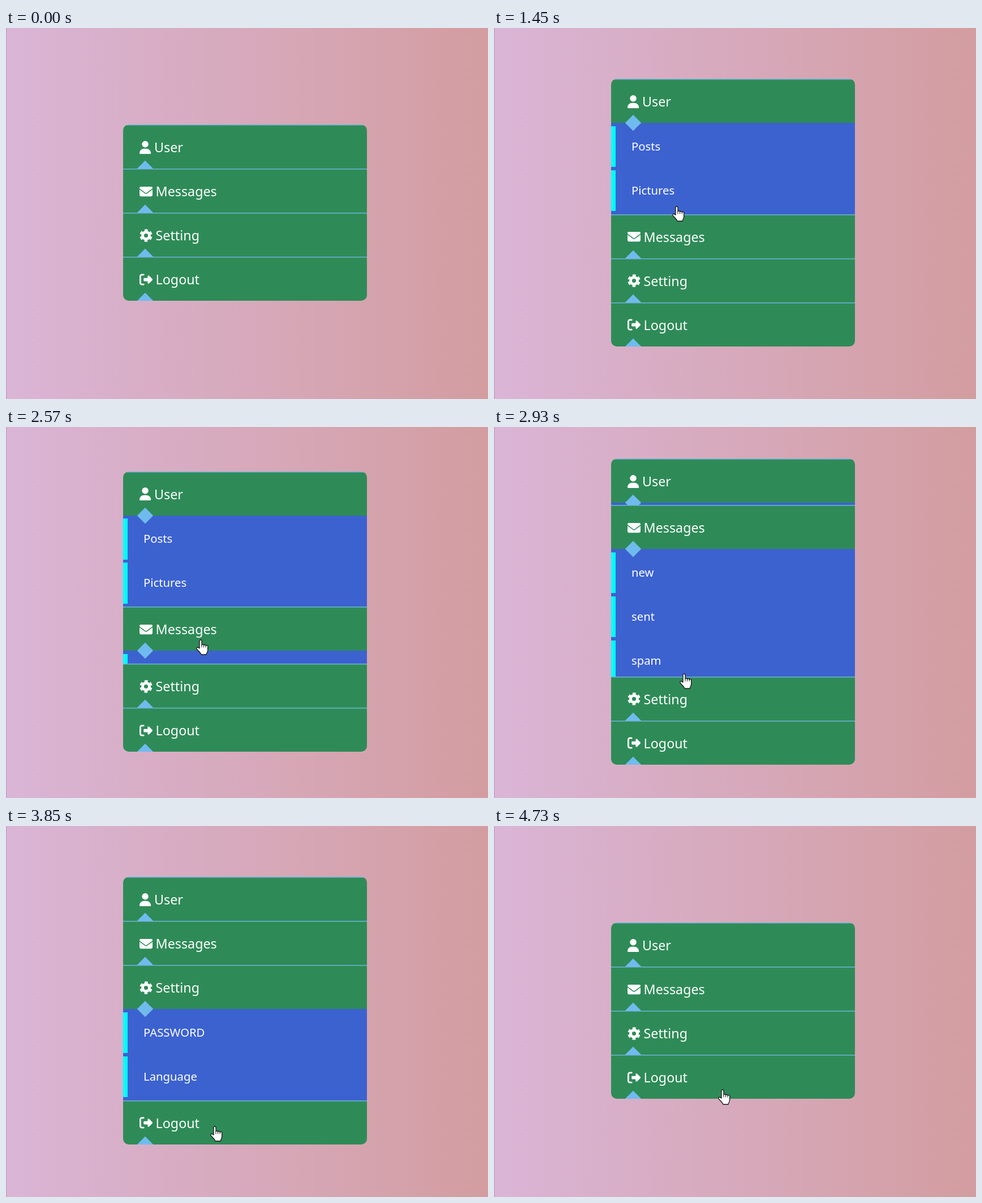
Animation, 852 px wide and 657 px high, one loop 4780 ms. Source, as an HTML page:

```html
<!DOCTYPE html>
<html lang="en">
<head>
<meta charset="utf-8">
<title>Accordion menu</title>
<style>
  :root { --loop: 4780ms; --green: #2e8b57; --sky: #70bbee; }
  html, body { margin: 0; width: 100%; height: 100%; overflow: hidden; }
  body {
    position: relative;
    display: flex;
    align-items: center;
    background: linear-gradient(to right, #dab5d6, #d39da0);
    box-shadow: inset 1px 0 #b796ae;
    font-family: "Noto Sans", "Open Sans", sans-serif;
    color: #fff;
  }
  ul { margin: 0; padding: 0; list-style: none; }

  .menu {
    position: relative;
    top: -1.5px;
    margin-left: 207px;
    width: 431px;
    border-radius: 10px;
    overflow: hidden;
  }
  .item { position: relative; overflow: hidden; }
  .head {
    position: relative;
    height: 78px;
    box-sizing: border-box;
    padding-left: 28.5px;
    background: linear-gradient(#6db3dc 1px, #4f9f94 1px 2px, var(--green) 2px);
    font-size: 23.3px;
    line-height: 80px;
    white-space: nowrap;
  }
  .head svg {
    position: absolute;
    top: 28.5px;
    width: 23px;
    height: 23px;
    fill: #fff;
    overflow: visible;
  }
  .head span { position: absolute; left: 57.5px; }
  .user span { left: 55px; }
  .head::after {
    content: "";
    position: absolute;
    z-index: 1;
    left: 29px;
    bottom: -10px;
    width: 20px;
    height: 20px;
    background: var(--sky);
    transform: rotate(45deg);
  }

  .sub { max-height: 0; overflow: hidden; background: #3c62d0; }
  .sub li {
    height: 72.5px;
    margin-bottom: 5.5px;
    padding-left: 28px;
    border-left: 8px solid #0ff;
    font-size: 20.3px;
    line-height: 70px;
  }
  .sub li:first-child { margin-top: 5.5px; }
  .sub { display: flow-root; }

  /* Each panel eases open or shut over half a second. */
  .user + .sub { animation: user var(--loop) ease infinite; }
  .mail + .sub { animation: mail var(--loop) ease infinite; }
  .gear + .sub { animation: gear var(--loop) ease infinite; }
  @keyframes user {
    0%, 17.57% { max-height: 0; }
    28.03%, 52.7% { max-height: 230px; }
    63.16%, 100% { max-height: 0; }
  }
  @keyframes mail {
    0%, 52.7% { max-height: 0; }
    63.16%, 69.56% { max-height: 230px; }
    80.02%, 100% { max-height: 0; }
  }
  @keyframes gear {
    0%, 69.56% { max-height: 0; }
    80.02%, 84.73% { max-height: 230px; }
    95.19%, 100% { max-height: 0; }
  }

  .cursor {
    position: absolute;
    left: 0;
    top: 0;
    width: 1px;
    height: 1px;
    overflow: visible;
    fill: #fff;
    stroke: #181818;
    stroke-width: 1.3;
    stroke-linejoin: round;
    animation: move var(--loop) linear infinite;
  }
  .arrow { animation: arrow var(--loop) step-end infinite; }
  .hand { animation: hand var(--loop) step-end infinite; }
  @keyframes arrow {
    0% { opacity: 0; }
    5.43% { opacity: 1; }
    9.4%, 100% { opacity: 0; }
  }
  @keyframes hand {
    0% { opacity: 0; }
    9.4%, 100% { opacity: 1; }
  }
  @keyframes move {
    0%, 5.44% { transform: translate(424px, 578px); animation-timing-function: ease-in-out; }
    16.74%, 20.92% { transform: translate(269px, 213px); animation-timing-function: ease-in-out; }
    28.24%, 30.1% { transform: translate(300px, 308px); }
    30.33% { transform: translate(323px, 316px); animation-timing-function: ease-in-out; }
    40.8%, 41.8% { transform: translate(327px, 396px); }
    44.98% { transform: translate(338px, 420px); animation-timing-function: ease-in-out; }
    49.16% { transform: translate(350px, 360px); }
    52.51%, 54.5% { transform: translate(344px, 377px); animation-timing-function: ease-in-out; }
    61.3% { transform: translate(336px, 437px); }
    64.23% { transform: translate(334px, 456px); }
    66.74%, 69.87% { transform: translate(344px, 470px); animation-timing-function: ease-in-out; }
    80.33%, 83.4% { transform: translate(369px, 532px); }
    83.47%, 86.61% { transform: translate(362px, 516px); animation-timing-function: ease-in-out; }
    96.86% { transform: translate(410px, 474px); }
    98.95%, 100% { transform: translate(404px, 467px); }
  }
</style>
</head>
<body>
  <ul class="menu">
    <li class="item">
      <div class="head user">
        <svg viewBox="0 0 512 512">
          <circle cx="224" cy="128" r="128"/>
          <path d="M178 304C80 304 0 383 0 482c0 16 13 30 30 30h388c17 0 30-14 30-30 0-99-80-178-178-178z"/>
        </svg>
        <span>User</span>
      </div>
      <ul class="sub"><li>Posts</li><li>Pictures</li></ul>
    </li>
    <li class="item">
      <div class="head mail">
        <svg viewBox="0 0 512 512">
          <path d="M48 64a48 48 0 0 0-29 86l218 164q19 13 38 0l218-164a48 48 0 0 0-29-86z"/>
          <path d="M0 176v208a64 64 0 0 0 64 64h384a64 64 0 0 0 64-64V176L294 339q-38 26-76 0z"/>
        </svg>
        <span>Messages</span>
      </div>
      <ul class="sub"><li>new</li><li>sent</li><li>spam</li></ul>
    </li>
    <li class="item">
      <div class="head gear">
        <svg viewBox="0 0 512 512">
          <g fill="none" stroke="#fff">
            <circle cx="256" cy="256" r="135" stroke-width="110"/>
            <circle cx="256" cy="256" r="210" stroke-width="80" pathLength="12" stroke-dasharray="1.1 .9" stroke-dashoffset="-.45"/>
          </g>
        </svg>
        <span>Setting</span>
      </div>
      <ul class="sub"><li>PASSWORD</li><li>Language</li></ul>
    </li>
    <li class="item">
      <div class="head">
        <svg viewBox="0 0 512 512">
          <path d="M378 106l123 123q22 27 0 54L378 406c-21 21-58 7-58-24v-62H192a32 32 0 0 1-32-32v-64a32 32 0 0 1 32-32h128v-62c0-31 37-45 58-24z"/>
          <path d="M160 64H96a64 64 0 0 0-64 64v256a64 64 0 0 0 64 64h64" fill="none" stroke="#fff" stroke-width="64" stroke-linecap="round"/>
        </svg>
        <span>Logout</span>
      </div>
    </li>
  </ul>

  <svg class="cursor">
    <path class="arrow" d="M0 0V24L5.5 18.8 9 27 12.6 25.4 9 17.6H16.5Z"/>
    <g class="hand">
      <path d="M-2 15V2a2 2 0 0 1 4 0V9.5a1.8 1.8 0 0 1 3.6.5a1.8 1.8 0 0 1 3.6.8a1.8 1.8 0 0 1 3.5 1V18C12.7 21.5 10.6 23 10 26H1C0 22.5-3.5 20-6.5 16C-8 13.5-5-12-2 15Z" style="d:path('M-2 15V2a2 2 0 0 1 4 0V9.5a1.8 1.8 0 0 1 3.6.5a1.8 1.8 0 0 1 3.6.8a1.8 1.8 0 0 1 3.5 1V18C12.7 21.5 10.6 23 10 26H1C0 22.5-3.5 20-6.5 16.5C-8.3 14-5.5 11.5-2 15Z')"/>
      <path d="M2 9.5V13.5M5.6 10V13.5M9.2 10.8V13.5" fill="none" stroke-width="1"/>
    </g>
  </svg>
</body>
</html>
```
